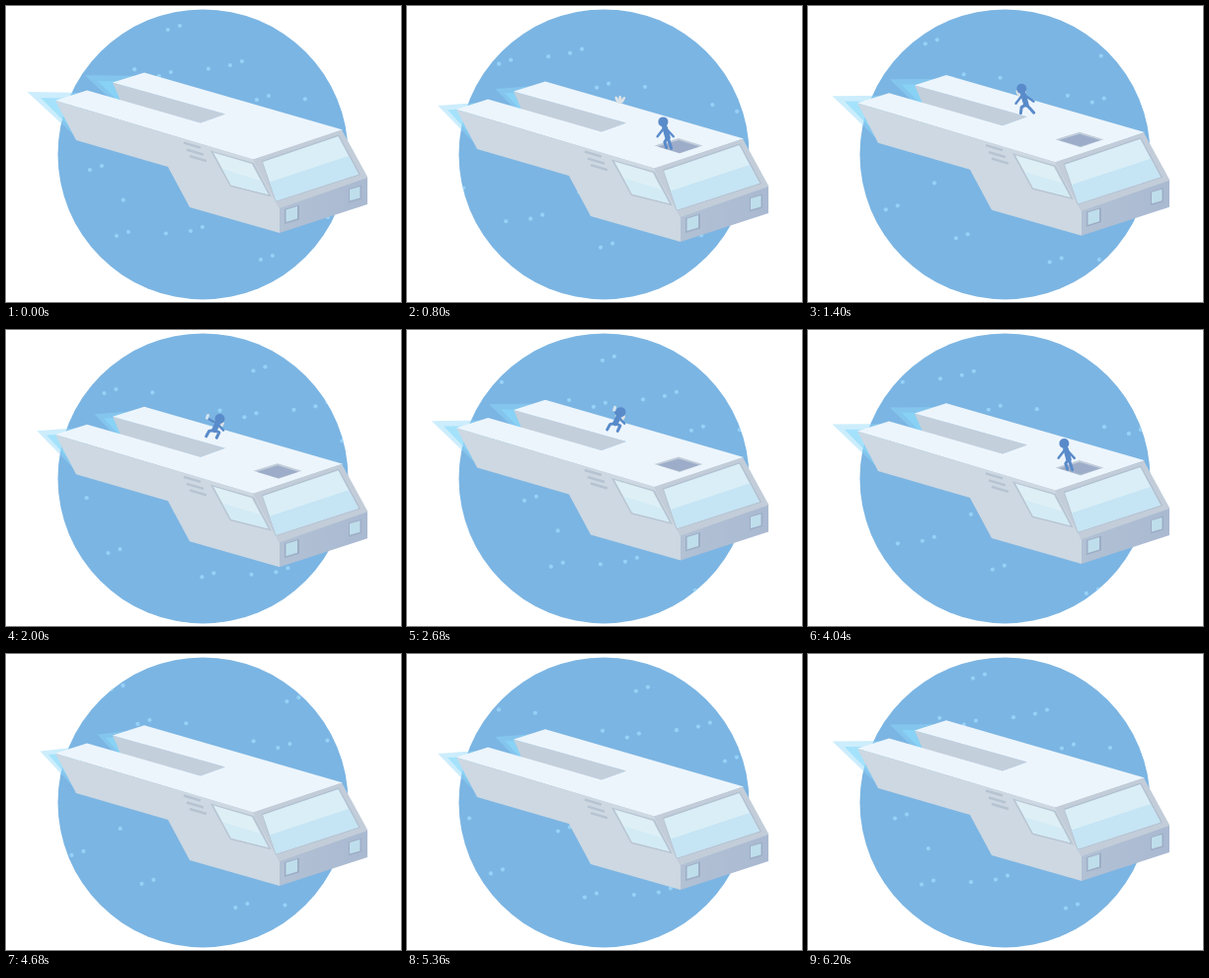
These frames come from a looping animation (400 px wide and 300 px high, 6.24 s). An HTML page:

```html
<!DOCTYPE html>
<html lang="en">
<head>
<meta charset="utf-8">
<title>Spaceship repair</title>
<style>
  html, body { margin: 0; width: 100%; height: 100%; overflow: hidden; background: #fff; }
  svg { display: block; width: 100vw; height: 100vh; }
</style>
</head>
<body>
<svg viewBox="0 0 400 300">
  <defs>
    <clipPath id="planet"><circle cx="199.5" cy="150.4" r="147"/></clipPath>
    <clipPath id="aboveHatch"><path d="M0 0H400V133H299L276 140.5 252 133H0Z"/></clipPath>
    <linearGradient id="nose"><stop stop-color="#b2c1d4"/><stop offset="1" stop-color="#a9b9d1"/></linearGradient>
  </defs>
  <circle cx="199.5" cy="150.4" r="147" fill="#7bb5e3"/>
  <g clip-path="url(#planet)"><g id="stars" fill="#96d1f7"></g></g>

  <g id="ship">
    <g id="flames"></g>
    <path fill="#c3cfdb" d="M108 77.500 222 109.500 197 118.500 116 96Z"/>
    <path fill="#edf5fc" d="M50 95.700 82 85.500 197 118.500 222 109.500 108 77.500 140 67.300 341 125.400 251 156Z"/>
    <path fill="#cdd8e2" d="M50 95.700 251 155.500 277 204V230L186 204 164 163 71 136Z"/>
    <path fill="#c2cdd9" d="M250 155.500 340 125.500 366 173V176L277 206Z"/>
    <path fill="url(#nose)" d="M277 205 366 174V201L277 230Z"/>
    <path fill="#b0bfd0" d="M259 157 337 130.500 359 171 273 198.500Z"/>
    <path fill="#d9eef6" d="M260 158 336.500 132 357 170.500 273.500 197.500Z"/>
    <path fill="#c5e4f4" d="M267 178.500 347 152 357 170.500 273.500 197.500Z"/>
    <path fill="#b8c5d3" d="M207 146.500 251 159 269 193.500 227 183Z"/>
    <path fill="#def0f6" d="M210 148.500 249 160 265.500 191 228 181.500Z"/>
    <path fill="#d3ebf5" d="M219 165 258 177 265.500 191 228 181.500Z"/>
    <path stroke="#b6c3d1" stroke-width="2.400" d="M180 138.500l17 5m-14 2l17 5m-14 1.500l17 5"/>
    <path fill="#9dadc6" d="M282 206l15-4.500v15l-15 4.500zM347 185.500l13-4v14l-13 4z"/>
    <path fill="#bfdeeb" d="M283.500 206.500l11.500-3.500v12.500l-11.500 3.500zM348 186l10.500-3v11.500l-10.500 3z"/>
    <g id="hatch">
      <path fill="#c0ccd9" d="M250.500 132.500 275 125 299.500 132.500 276 140.500Z"/>
      <path fill="#9dadc9" d="M254 133.300 275 127 296 133.300 276 139.800Z"/>
    </g>
    <g id="shards" fill="#dde2e4"></g>
    <g clip-path="url(#aboveHatch)">
      <g id="man" fill="none" stroke="#598bca" stroke-linecap="round" stroke-linejoin="round">
        <path id="legs" stroke-width="3"/>
        <path id="arms" stroke-width="2.400"/>
        <path id="torso" stroke-width="5.500"/>
        <circle id="head" r="5" fill="#598bca" stroke="none"/>
        <path id="tool" stroke="#d5e4ee" stroke-width="3"/>
      </g>
    </g>
  </g>
</svg>
<script>
const LOOP = 6240;
const $ = id => document.getElementById(id);
const mix = (a, b, k) => a + (b - a) * k;
const wave = phase => (1 - Math.cos(2 * Math.PI * phase)) / 2;
const ramp = (t, from, to) => {
  const x = Math.max(0, Math.min(1, (t - from) / (to - from)));
  return x * x * (3 - 2 * x);
};
// Rises during the first interval and falls during the second.
const hold = (t, up0, up1, down0, down1) => ramp(t, up0, up1) - ramp(t, down0, down1);
const line = (...points) => "M" + points.map(p => p.join(" ")).join("L");
const move = (id, x, y) => $(id).setAttribute("transform", `translate(${x} ${y})`);
const grow = (id, x, y, k) =>
  $(id).setAttribute("transform", `translate(${x} ${y}) scale(${k}) translate(${-x} ${-y})`);

let seed = 11;
const random = () => (seed = seed * 16807 % 2147483647) / 2147483647;

// Star pairs plus random strays; the field repeats along its drift vector.
const DRIFT = { x: 241, y: 48.2, time: LOOP / 2 };
const PAIRS = [[164, 24], [227, 60], [155, 71], [254, 95], [85, 166], [112, 233], [187, 228], [258, 257]];
const stars = PAIRS.flatMap(([x, y]) => [[x, y], [x + 12, y - 4]]);
for (let i = 0; i < 8; i++) {
  const angle = i * Math.PI / 4 + random() * 0.5;
  const radius = 60 + random() * 70;
  stars.push([199 + radius * Math.cos(angle), 150 + radius * Math.sin(angle)]);
}
$("stars").innerHTML = [0, 1].map(copy => stars.map(([x, y]) =>
  `<circle cx="${x + copy * DRIFT.x}" cy="${y + copy * DRIFT.y}" r="2.1"/>`).join("")).join("");

// Each engine has an outer and an inner flame.
const flame = '<path fill="#8fd8f9" fill-opacity=".45"/><path fill="#8adcfc" fill-opacity=".6"/>';
$("flames").innerHTML = `<g transform="translate(58 -17)">${flame}</g><g>${flame}</g>`;

$("shards").innerHTML = [-28, 2, 32].map(angle =>
  `<ellipse cx="215.500" cy="85.500" rx="1.500" ry="4" transform="rotate(${angle} 215.500 91)"/>`).join("");

// Angles are measured from straight down, positive to the right.
const limb = ([x, y], angle, length) => [x + length * Math.sin(angle), y + length * Math.cos(angle)];

function leg(thigh, shin) {
  const knee = limb([0, 0], thigh, 5.5);
  return [knee, limb(knee, shin, 6)];
}

function drawMan(t) {
  const risen = hold(t, 450, 820, 4100, 4440);
  const place = hold(t, 880, 1600, 3200, 3900);
  const kneel = hold(t, 1540, 1740, 3060, 3240);
  const stride = 0.6 * Math.sin(place * Math.PI * 4);
  const hammer = kneel * wave((t - 2000) / 480);

  const hip = [0, 0];
  const lean = Math.PI - mix(-0.28, 0.45, kneel);
  const neck = limb(hip, lean, mix(11, 7, kneel));
  const head = limb(neck, lean, 5.6);
  const handL = limb(neck, mix(-0.66, -2.07, kneel) - 0.55 * hammer, 12 - 4 * hammer);
  const handR = limb(neck, 0.75 - stride / 2, mix(13, 9, kneel));
  const [kneeL, footL] = leg(mix(-0.6, -1.37, kneel) + stride, mix(0.3, -0.5, kneel) + stride);
  const [kneeR, footR] = leg(mix(0.35, 1.1, kneel) - stride, mix(0.3, -0.45, kneel) - stride);

  $("man").style.display = risen > 0 ? "" : "none";
  move("man", mix(264, 211, place), mix(124, 91, place) + 30 * (1 - risen));
  $("legs").setAttribute("d", line(footL, kneeL, hip, kneeR, footR));
  $("arms").setAttribute("d", line(handL, neck, handR));
  $("torso").setAttribute("d", line(neck, hip));
  $("head").setAttribute("cx", head[0]);
  $("head").setAttribute("cy", head[1]);
  $("tool").setAttribute("d", line(handL, limb(handL, 2.8, 3)));
  $("tool").style.display = kneel > 0.5 ? "" : "none";
}

function draw(t) {
  const drift = t % DRIFT.time / DRIFT.time;
  move("stars", -DRIFT.x * drift, -DRIFT.y * drift);
  move("ship", 0, 12.4 * wave(t / (LOOP / 5) + 0.03));

  const shrink = wave(t / 240);
  for (const { children: [outer, inner] } of $("flames").children) {
    outer.setAttribute("d", line([21.5 + 13 * shrink, 87 + 6.5 * shrink], [84, 88], [72, 134]) + "Z");
    inner.setAttribute("d", line([35 + 8 * shrink, 93 + 4 * shrink], [84, 94], [70, 128]) + "Z");
  }

  grow("hatch", 275, 133, hold(t, 300, 520, 4400, 4640));
  grow("shards", 215.5, 90, hold(t, 240, 400, 2800, 3000));
  drawMan(t);
}

const start = performance.now();
function tick() {
  draw((performance.now() - start) % LOOP);
  requestAnimationFrame(tick);
}
tick();
</script>
</body>
</html>
```
